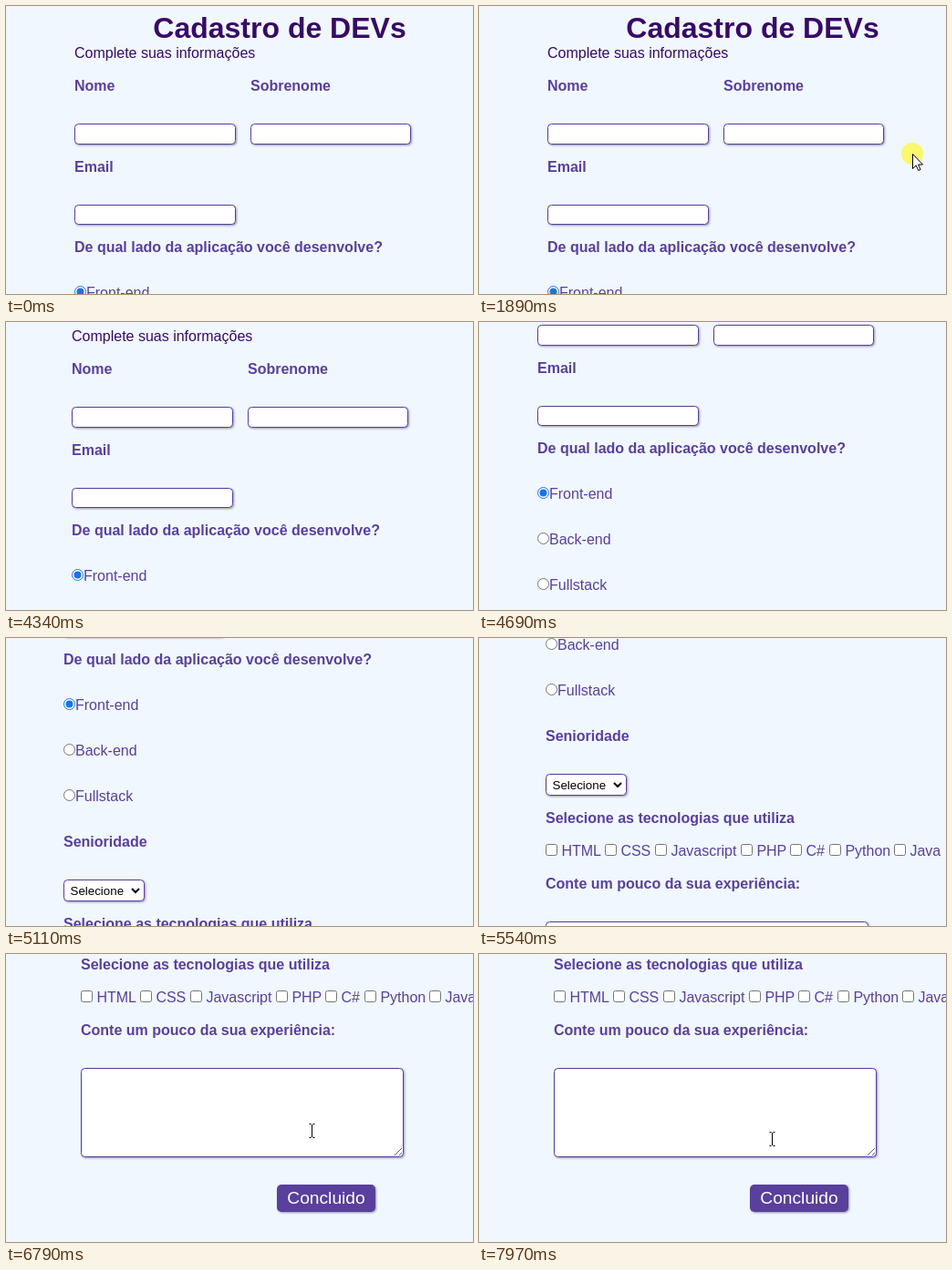
Write an HTML page that moves like this. It is 512x316 px and loops after 8 s.

```html
<!DOCTYPE html>
<html lang="pt-BR">
<head>
<meta charset="utf-8">
<title>Cadastro de DEVs</title>
<style>
  html, body { margin: 0; width: 100%; height: 100%; overflow: hidden; background: #f0f7ff; }
  svg { display: block; width: 100vw; height: 100vh; }
  text { font: 16px "Liberation Sans", Arial, sans-serif; fill: #59409c; white-space: pre; }
  .bold { font-weight: bold; }
  .dark { fill: #380a66; }
  .title { font-size: 32px; font-weight: bold; text-anchor: middle; }
  .small { font-size: 13.333px; fill: #000; }
  .send { font-size: 19.2px; fill: #fff; text-anchor: middle; }
  .field { fill: #fff; stroke: #573e9b; }
  .field, #button { filter: drop-shadow(1.5px 1.5px 1px rgba(60, 45, 110, .5)); }
  .tick { fill: #fff; stroke: #767676; }
  #button { fill: #59409c; }
  #button.hover { fill: #6a50b2; }
</style>
</head>
<body>
<svg viewBox="0 0 512 316">
  <g id="page"></g>
  <circle id="halo" r="12" fill="#faf86c"/>
  <g id="cursor">
    <path id="arrow" d="M.5 .5V16.5L4.2 13 6.8 18.5 9 17.5 6.5 12H11.5Z" fill="#fff" stroke="#000"/>
    <path id="beam" d="M-2.5-7.5H-.5M1.5-7.5H3.5M-2.5 7.5H-.5M1.5 7.5H3.5M.5-7V7" fill="none" stroke="#000"/>
    <path id="hand" d="M-1.5 13V2Q-1.5.5 0 .5T1.5 2V7.5Q4.5 6.5 4.8 8.5 7.5 7.5 7.8 9.5 10.5 9 10.5 11.5V15Q10.5 17 8.5 18.5V21.5H-.5V19L-5.5 13Q-6 10.5-4 10.7Z" fill="#fff" stroke="#000"/>
  </g>
</svg>
<script>
const LOOP = 8000;
const $ = id => document.getElementById(id);
const page = $('page');

function add(tag, attrs, text) {
  const el = document.createElementNS('http://www.w3.org/2000/svg', tag);
  for (const k in attrs) el.setAttribute(k, attrs[k]);
  if (text) el.textContent = text;
  page.append(el);
  return el;
}
const write = (text, x, y, cls = '') => add('text', { x, y, class: cls }, text);
const field = (x, y, width, height) =>
  add('rect', { x: x + .5, y: y + .5, width: width - 1, height: height - 1, rx: 4, class: 'field' });

write('Cadastro de DEVs', 300, 35, 'title dark');
write('Complete suas informações', 75, 57, 'dark');
write('Nome', 75, 93, 'bold');
write('Sobrenome', 268, 93, 'bold');
field(75, 129, 177, 23);
field(268, 129, 176, 23);
write('Email', 75, 182, 'bold');
field(75, 218, 177, 22);
write('De qual lado da aplicação você desenvolve?', 75, 270, 'bold');

['Front-end', 'Back-end', 'Fullstack'].forEach((label, i) => {
  const cy = 313.5 + i * 50;
  const ring = add('circle', { cx: 81.5, cy, r: 6, class: 'tick' });
  if (!i) {
    ring.style.stroke = '#1a75e0';
    add('circle', { cx: 81.5, cy, r: 4, fill: '#1a75e0' });
  }
  write(label, 88, 320 + i * 50);
});

write('Senioridade', 75, 470, 'bold');
field(75, 506, 89, 24);
write('Selecione', 82.5, 523, 'small');
add('path', { d: 'M150 516l4 4 4-4', fill: 'none', stroke: '#000', 'stroke-width': 2 });

write('Selecione as tecnologias que utiliza', 75, 560, 'bold');
const skills = { HTML: 75, CSS: 140, Javascript: 195, PHP: 289, 'C#': 343, Python: 386, Java: 457 };
for (const name in skills) {
  const x = skills[name];
  add('rect', { x: x + .5, y: 583.5, width: 12, height: 12, rx: 2, class: 'tick' });
  write(name, x + 17.4, 596);
}

write('Conte um pouco da sua experiência:', 75, 632, 'bold');
field(75, 668, 354, 98);
add('path', { d: 'M419 764l8-8M424 764l3-3', stroke: '#666' });
add('rect', { id: 'button', x: 290, y: 796, width: 108, height: 30, rx: 5 });
write('Concluido', 344, 817, 'send');

// Runs of repaints: first time, last time, count
const runs = [
  [130, 200, 2], [400, 1150, 11], [1210, 1890, 9], [2020, 2230, 4], [2650, 2720, 2],
  [3650, 4070, 7], [4270, 5040, 12], [5110, 5890, 12], [5960, 6720, 12],
  [6790, 7560, 12], [7620, 7970, 6]
];
const ticks = [0];
for (const [from, to, n] of runs)
  for (let i = 0; i < n; i++) ticks.push(Math.round(from + (to - from) * i / (n - 1)));

// Keys: time, x, y
const scroll = [
  [0, 0, 0], [4200, 0, 0], [4690, -11, -126], [5040, -14, -222], [5535, -2, -357],
  [5890, 5, -447], [6098, 7, -498], [6180, 7, -516], [6300, 7, -531], [6450, 7, -539],
  [6720, 7, -543], [LOOP, 7, -543]
];
// Each path is one stretch of time with the pointer on screen
const paths = [
  [[130, 397, 264], [200, 395, 263], [330, 395, 263], [500, 388, 249], [800, 357, 204],
   [1050, 334, 166], [1150, 331, 161], [1300, 345, 152], [1550, 398, 143], [1750, 456, 154],
   [1890, 475, 162], [1950, 475, 162], [2230, 431, 150], [2649, 431, 150], [2650, 464, 157], [2719, 464, 157]],
  [[3650, 457, 104], [4000, 334, 0], [4069, 334, 0]],
  [[6790, 335, 194], [6950, 337, 212], [7140, 343, 248], [7350, 347, 274], [7560, 342, 267],
   [7970, 321, 203], [LOOP, 321, 203]]
];

function at(keys, t) {
  const i = Math.max(1, keys.findIndex(k => k[0] >= t));
  const a = keys[i - 1], b = keys[i];
  const p = (t - a[0]) / (b[0] - a[0]);
  return [1, 2].map(c => Math.round(a[c] + (b[c] - a[c]) * p));
}
const show = (el, on) => el.setAttribute('visibility', on ? 'visible' : 'hidden');
const move = (el, [x, y]) => el.setAttribute('transform', `translate(${x} ${y})`);

function draw(time) {
  const t = ticks.findLast(s => s <= time);
  move(page, at(scroll, t));

  const path = paths.find(p => t >= p[0][0] && t <= p[p.length - 1][0]);
  let kind = '';
  if (path) {
    const pos = at(path, t);
    move($('cursor'), pos);
    move($('halo'), pos);
    kind = t < 6790 ? 'arrow' : pos[1] < 223 ? 'beam' : pos[1] < 253 ? 'arrow' : 'hand';
  }
  for (const id of ['arrow', 'beam', 'hand']) show($(id), id === kind);
  show($('halo'), t === 1890);
  $('button').classList.toggle('hover', kind === 'hand');
}

const start = performance.now();
function loop() {
  draw((performance.now() - start) % LOOP);
  requestAnimationFrame(loop);
}
loop();
</script>
</body>
</html>
```
